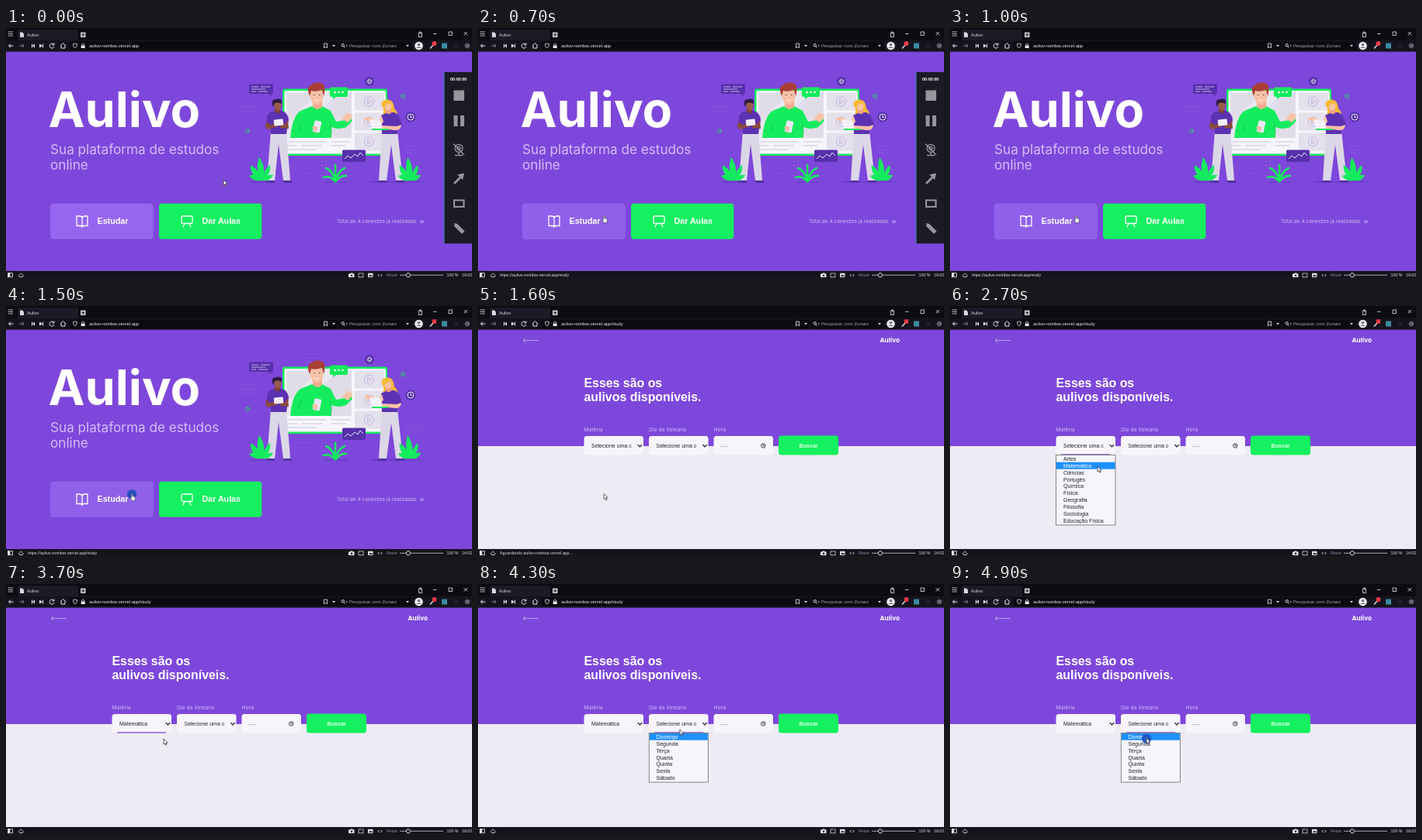
Animation, 600 px wide and 323 px high, one loop 5000 ms. Source, as an HTML page:

```html
<!DOCTYPE html>
<html lang="pt-BR">
<head>
<meta charset="utf-8">
<title>Aulivo</title>
<style>
html, body { margin: 0; width: 100%; height: 100%; overflow: hidden; background: #15131d; }
svg.stage { display: block; width: 100%; height: 100%; }
text { font-family: "Liberation Sans", Arial, sans-serif; white-space: pre; }
.geo { font-family: Inter, sans-serif; }
.b { font-weight: 700; }
.pale { fill: #d3bdf7; }
.line { fill: none; stroke: #e9e7ef; }
.k { animation: 5s step-end infinite; }

.home { animation-name: home; }
.path { animation-name: study; }
.panel { animation-name: panel; }
.hover { animation-name: hover; }
.wait { animation-name: wait; }
.empty { animation-name: empty; }
.chosen { animation-name: chosen; }
.focus1 { animation-name: focus1; }
.focus2 { animation-name: focus2; }
.menu1 { animation-name: menu1; }
.menu2 { animation-name: menu2; }
.arrow { animation-name: arrow; }
.click { animation-name: click; }
.row { animation-name: row; }
.cursor { animation: move 5s infinite; }

@keyframes home { 0% { visibility: visible } 32%, 100% { visibility: hidden } }
@keyframes study { 0% { visibility: hidden } 32%, 100% { visibility: visible } }
@keyframes panel { 0% { visibility: visible } 20%, 100% { visibility: hidden } }
@keyframes hover { 0%, 32%, 100% { visibility: hidden } 8% { visibility: visible } }
@keyframes arrow { 0%, 32%, 100% { visibility: visible } 8% { visibility: hidden } }
@keyframes wait { 0%, 42%, 100% { visibility: hidden } 32% { visibility: visible } }
@keyframes empty { 0% { visibility: visible } 72%, 100% { visibility: hidden } }
@keyframes chosen { 0% { visibility: hidden } 72%, 100% { visibility: visible } }
@keyframes focus1 { 0%, 82%, 100% { visibility: hidden } 46% { visibility: visible } }
@keyframes focus2 { 0% { visibility: hidden } 82%, 100% { visibility: visible } }
@keyframes menu1 { 0%, 72%, 100% { visibility: hidden } 48% { visibility: visible } }
@keyframes menu2 { 0% { visibility: hidden } 84%, 100% { visibility: visible } }
@keyframes click {
  0%, 32%, 48%, 72%, 84% { visibility: hidden }
  28%, 46%, 70%, 82%, 98%, 100% { visibility: visible }
}
@keyframes row {
  0%, 48% { transform: translateY(0) }
  54%, 68%, 100% { transform: translateY(8.92px) }
  56%, 66% { transform: translateY(26.76px) }
  58%, 62% { transform: translateY(53.52px) }
  60% { transform: translateY(71.36px) }
  64% { transform: translateY(35.68px) }
}
@keyframes move {
  0% { transform: translate(280px, 196px); animation-timing-function: steps(2) }
  4% { transform: translate(265px, 203px); animation-timing-function: steps(2) }
  8% { transform: translate(190px, 234px); animation-timing-function: steps(2) }
  12% { transform: translate(163px, 243px); animation-timing-function: steps(1) }
  14%, 38% { transform: translate(162px, 242.5px); animation-timing-function: steps(3) }
  44% { transform: translate(178px, 196px); animation-timing-function: steps(1) }
  46% { transform: translate(186px, 182px); animation-timing-function: steps(1) }
  48% { transform: translate(188px, 186px); animation-timing-function: steps(3) }
  54% { transform: translate(190px, 207px); animation-timing-function: steps(3) }
  60% { transform: translate(188px, 267px); animation-timing-function: steps(3) }
  66% { transform: translate(196px, 222px); animation-timing-function: steps(1) }
  68% { transform: translate(197px, 206px); animation-timing-function: steps(2) }
  72% { transform: translate(198px, 204px); animation-timing-function: steps(1) }
  74% { transform: translate(203px, 200px); animation-timing-function: steps(3) }
  80% { transform: translate(240px, 188px); animation-timing-function: steps(1) }
  82% { transform: translate(262px, 182px); animation-timing-function: steps(1) }
  84% { transform: translate(262px, 184px); animation-timing-function: steps(4) }
  92%, 100% { transform: translate(253px, 199px) }
}
</style>
</head>
<body>
<svg class="stage" viewBox="0 0 600 323" preserveAspectRatio="none">
<defs>
  <pattern id="dots" width="5" height="5" patternUnits="userSpaceOnUse"><circle cx="2" cy="2" r=".55" fill="#9a75e8"/></pattern>
  <clipPath id="rowClip"><rect class="k row" x="136" y="192.8" width="77.5" height="8.92"/></clipPath>
  <clipPath id="firstRow"><rect x="220" y="192.8" width="77" height="8.92"/></clipPath>
  <clipPath id="valueClip"><rect x="0" y="168" width="51.4" height="24"/></clipPath>
  <clipPath id="video"><rect x="361" y="60" width="85" height="82"/></clipPath>
  <path id="chev" d="M-2.7-1.3 0 1.4 2.7-1.3" fill="none" stroke="#222" stroke-width="1.3"/>
  <g id="play" fill="none" stroke="#c3b8dc"><circle r="6"/><path d="M-1.8-3 3 0-1.8 3z"/></g>
  <g id="bush"><path d="M0 0Q-10-12-4-30Q6-16 0 0"/><path d="M0 0Q-16-5-15-20Q-4-14 0 0"/><path d="M0 0Q2-15 10-20Q12-8 0 0"/><path d="M0 0Q-11 2-17-6Q-6-10 0 0M0 0Q9 2 14-7Q5-9 0 0"/></g>
  <text id="list1" font-size="7"><tspan x="146" y="199.8">Artes</tspan><tspan x="146" dy="8.92">Matemática</tspan><tspan x="146" dy="8.92">Ciências</tspan><tspan x="146" dy="8.92">Portugês</tspan><tspan x="146" dy="8.92">Química</tspan><tspan x="146" dy="8.92">Física</tspan><tspan x="146" dy="8.92">Geografia</tspan><tspan x="146" dy="8.92">Filosofia</tspan><tspan x="146" dy="8.92">Sociologia</tspan><tspan x="146" dy="8.92">Educação Física</tspan></text>
  <text id="list2" font-size="7"><tspan x="229.5" y="199.8">Domingo</tspan><tspan x="229.5" dy="8.92">Segunda</tspan><tspan x="229.5" dy="8.92">Terça</tspan><tspan x="229.5" dy="8.92">Quarta</tspan><tspan x="229.5" dy="8.92">Quinta</tspan><tspan x="229.5" dy="8.92">Sexta</tspan><tspan x="229.5" dy="8.92">Sábado</tspan></text>
</defs>

<!-- study page -->
<rect y="30" width="600" height="285" fill="#efebf5"/>
<rect y="30" width="600" height="151" fill="#7e47db"/>
<path d="M78 44.5H58M61.500 41.500 58 44.500 61.500 47.500" fill="none" stroke="#b79be9"/>
<text class="geo b" x="517.500" y="47.300" font-size="8.200" fill="#fff">Aulivo</text>
<g class="b" font-size="15.900" fill="#fff"><text x="136.500" y="105">Esses são os</text><text x="136.500" y="123.300">aulivos disponíveis.</text></g>
<g class="pale" font-size="6.800"><text class="geo" x="136.500" y="162">Matéria</text><text class="geo" x="220" y="162">Dia da Semana</text><text class="geo" x="303.500" y="162">Hora</text></g>
<g fill="#f7f5fb"><rect x="136.500" y="168" width="76.500" height="24.300" rx="3.500"/><rect x="220" y="168" width="76.500" height="24.300" rx="3.500"/><rect x="303.500" y="168" width="76.500" height="24.300" rx="3.500"/></g>
<use href="#chev" x="208.500" y="180.500"/><use href="#chev" x="292" y="180.500"/>
<g font-size="7" fill="#222">
  <g class="k empty" transform="translate(146 0)"><text y="183" clip-path="url(#valueClip)">Selecione uma o</text></g>
  <text class="k chosen" x="146" y="183">Matemática</text>
  <g transform="translate(229.500 0)"><text y="183" clip-path="url(#valueClip)">Selecione uma o</text></g>
  <text x="311" y="183" fill="#777">--:--</text>
</g>
<g fill="none" stroke="#222" stroke-width=".9"><circle cx="367.200" cy="180.500" r="2.700"/><path d="M367.200 178.700V180.700H368.700"/></g>
<rect x="387" y="167.500" width="77" height="25" rx="3.500" fill="#14f05f"/>
<text class="b" x="413.500" y="183" font-size="7.200" fill="#e9fff0">Buscar</text>
<rect class="k focus1" x="143" y="191.300" width="63" height="1.300" fill="#7e47db"/>
<rect class="k focus2" x="227" y="191.300" width="63" height="1.300" fill="#7e47db"/>
<g class="k menu1">
  <rect x="136.500" y="192.500" width="76.500" height="90.500" fill="#f7f5fb" stroke="#777" stroke-width=".9"/>
  <use href="#list1" fill="#222"/>
  <g clip-path="url(#rowClip)"><rect x="137" y="192.800" width="75.700" height="90" fill="#1e90ff"/><use href="#list1" fill="#fff"/></g>
</g>
<g class="k menu2">
  <rect x="220.300" y="192.500" width="76" height="63.600" fill="#f7f5fb" stroke="#777" stroke-width=".9"/>
  <use href="#list2" fill="#222"/>
  <g clip-path="url(#firstRow)"><rect x="220.800" y="192.800" width="75" height="63" fill="#1e90ff"/><use href="#list2" fill="#fff"/></g>
</g>

<!-- home page -->
<g class="k home">
  <rect y="30" width="600" height="285" fill="#7e47db"/>
  <text class="geo b" x="54.500" y="128" font-size="63" fill="#fff">Aulivo</text>
  <g class="pale" font-size="17.150"><text class="geo" x="57" y="162.500">Sua plataforma de estudos</text><text class="geo" x="57" y="182.500">online</text></g>
  <rect x="57" y="226.700" width="132.500" height="46" rx="4" fill="#9766f0"/>
  <rect class="k hover" x="57" y="226.700" width="132.500" height="46" rx="4" fill="#9060ea"/>
  <rect x="197" y="226.700" width="132.300" height="46" rx="4" fill="#14f05f"/>
  <g fill="none" stroke="#fff" stroke-width="1.300" stroke-linejoin="round" stroke-linecap="round">
    <path d="M98 245.500Q97.500 243 94.500 243H91V255.500H95.500Q98 255.500 98 257.500Q98 255.500 100.500 255.500H105V243H101.500Q98.500 243 98 245.500V257"/>
    <rect x="226" y="243" width="14" height="9.500" rx="1.500"/><path d="M230 252.500 228 257M236 252.500 238 257"/>
  </g>
  <g class="b" font-size="10.700" fill="#fff"><text x="117.500" y="253.400">Estudar</text><text x="252.500" y="253.400">Dar Aulas</text></g>
  <text class="geo pale" x="426" y="251.800" font-size="6.500">Total de 4 conexões já realizadas</text>
  <path d="M535.500 253C531 250 532.500 247 535.500 248.700C538.500 247 540 250 535.500 253Z" fill="#a57cf2"/>

  <!-- illustration -->
  <g>
    <rect x="300" y="98" width="31" height="17" fill="url(#dots)"/><rect x="386" y="60" width="25" height="16" fill="url(#dots)"/>
    <rect x="515" y="148" width="30" height="18" fill="url(#dots)"/><rect x="375" y="166" width="40" height="30" fill="url(#dots)"/>
    <rect x="356" y="78.500" width="135" height="86.500" rx="3" fill="#14f05f"/>
    <rect x="358.500" y="81" width="130.500" height="81.500" rx="2" fill="#f7f5fb"/>
    <rect x="361" y="83.500" width="84" height="58.500" fill="#e0dde8"/>
    <path d="M361 125 402 83.500H428L370 142H361Z" fill="#e9e7ef"/>
    <g fill="#e4e0ec"><rect x="449" y="83.500" width="38" height="23" rx="1.500"/><rect x="449" y="109.500" width="38" height="23" rx="1.500"/><rect x="449" y="135.500" width="38" height="23" rx="1.500"/></g>
    <use href="#play" x="467.500" y="95"/><use href="#play" x="467.500" y="121"/><use href="#play" x="467.500" y="147"/>
    <path d="M361 147H412M361 152H375M380 152H407M361 157H400M419 147H443M419 152H437" stroke="#e0dce9" stroke-width="2"/>
    <g clip-path="url(#video)">
      <path d="M366 143Q368 115 379 107L394 101H407L418 107 425 121 437 119 443 113 446 120 438 128Q428 132 419 128L418 143Z" fill="#14ec5d"/>
      <path d="M378 142Q376 127 382 121M418 143Q420 134 418 122" fill="none" stroke="#0bc54b" stroke-width=".8"/>
      <path d="M395 92V102Q401 108 407 102V92Z" fill="#f2ab8d"/>
      <path d="M392 82Q391 98 400 99Q409 98 409 82L399 77Z" fill="#f8c1a5"/>
      <path d="M391 88Q386 77 392 74Q401 67 409 73Q412 77 409 88L407 80Q397 83 393 81Z" fill="#a83e35"/>
      <path d="M397 93Q400 95 403 93" fill="none" stroke="#fff" stroke-width=".9"/><path d="M396 86.500H397.500M403 86.500H404.500" stroke="#493050"/>
    </g>
    <path d="M432 117Q437 115 439 108L441 112L444 110L446 116L440 122Z" fill="#f8c1a5"/>
    <path d="M371 136 384 131 395 125 400 130 393 137 382 142H370Z" fill="#14ec5d"/>
    <rect x="396" y="120" width="9" height="15" rx="1.500" fill="#eee7fa" transform="rotate(12 401 128)"/>
    <path d="M394 128Q399 125 402 129L398 136Z" fill="#f8c1a5"/>

    <!-- person on the left -->
    <path d="M341 133 336 197H346L351 150 357 197H366L361 133Z" fill="#dcd7e6"/>
    <path d="M337 197H346V200H334ZM357 197H366L369 200H357Z" fill="#51329f"/>
    <path d="M337 112Q341 107 347 107H355Q362 108 364 118L361 137H341L340 126 335 124Z" fill="#5c32b2"/>
    <path d="M335 121Q333 129 337 131L351 127 350 123 340 125ZM363 119 364 130 353 129 353 125 359 124Z" fill="#8a4b3d"/>
    <path d="M346 98H353V109Q349 112 346 108Z" fill="#7d4135"/><ellipse cx="350" cy="100" rx="4.500" ry="6.500" fill="#99584a"/>
    <path d="M344 102Q340 92 348 92Q356 90 355 98Q351 95 346 97Z" fill="#2e1b40"/>
    <rect x="345" y="118" width="12" height="8" rx="1" fill="#f4eefb" transform="rotate(-5 351 122)"/>

    <!-- person on the right -->
    <path d="M486 104Q480 96 488 93Q499 90 500 104Q506 110 504 117H482Q487 112 486 104Z" fill="#f5ba38"/>
    <path d="M484 133 480 197H490L496 151 502 197H511L504 133Z" fill="#dcd7e6"/>
    <path d="M481 197H490V200H477ZM502 197H511L514 200H502Z" fill="#51329f"/>
    <path d="M483 113 491 109H499Q507 110 510 126L504 128 504 137H484Z" fill="#5c32b2"/>
    <path d="M489 101H496V110Q492 113 489 109Z" fill="#ee9f82"/><ellipse cx="492" cy="101" rx="4.500" ry="6" fill="#f8c1a5"/>
    <path d="M486 102Q485 93 492 94Q499 94 499 108Q496 101 495 97Q490 99 486 102Z" fill="#f5ba38"/>
    <path d="M509 125Q508 133 501 132L483 130 484 126 503 127ZM484 114 476 125 481 129 486 121ZM474 117 462 115V119L476 124Z" fill="#f8c1a5"/>
    <path d="M468 118 482 119 485 131H471Z" fill="#f6f1fd"/><path d="M471 130H492V132H471Z" fill="#14ec5d"/>

    <!-- floating badges -->
    <g fill="#572fac"><path d="M315 72.500H342Q344 72.500 344 74V83Q344 85 342 85H341L342 88 337 85H315Q313 85 313 83V74Q313 72.500 315 72.500Z"/><rect x="433" y="157.500" width="30" height="15.500" rx="1.500"/><circle cx="468" cy="69" r="6"/><circle cx="521" cy="115" r="6.500"/></g>
    <path d="M316 76H325M328 76H340M316 79H334M316 82H322M325 82H337" stroke="#cdbbf2" stroke-width=".9"/>
    <path d="M419 76.500H438Q440 76.500 440 78.500V87Q440 89 438 89H425L421 92V89H419Q417 89 417 87V78.500Q417 76.500 419 76.500Z" fill="#14ec5d"/>
    <g fill="#fff"><circle cx="423.500" cy="83" r="1.300"/><circle cx="428.500" cy="83" r="1.300"/><circle cx="433.500" cy="83" r="1.300"/></g>
    <path d="M436 169 440 165 444 168 449 163 453 166 456 161 460 165" class="line"/>
    <g class="line"><circle cx="468" cy="69" r="2"/><circle cx="468" cy="69" r="3.200" stroke-dasharray="1.200 1.300"/><circle cx="521" cy="115" r="4"/><path d="M521 112.500V115.500H523"/></g>
    <g fill="#14ec5d"><use href="#bush" x="330" y="197"/><use href="#bush" transform="translate(521 197) scale(.95 1)"/></g>
    <path d="M424 199V177M424 199Q421 184 412 181M424 199Q427 185 436 181M424 199Q418 190 409 193M424 199Q430 190 438 191" fill="none" stroke="#14ec5d" stroke-width="2.600" stroke-linecap="round"/>
    <g fill="none" stroke="#14ec5d"><circle cx="511" cy="88" r="2.200"/><circle cx="311" cy="133" r="2.200"/><path d="M512.500 89.500 514.500 91.500"/></g>
    <path d="M314 199H345M410 199H440M470 199H535" stroke="#572fac" stroke-width=".7"/>
  </g>

  <!-- recorder panel -->
  <g class="k panel">
    <rect x="564" y="57" width="36" height="221.500" fill="#1c1a26"/>
    <rect x="563.700" y="57" width=".9" height="221.500" fill="#258ca0"/>
    <text class="b" x="572" y="67.700" font-size="5.300" fill="#fff">00:00:00</text>
    <g fill="#96969c"><rect x="576.500" y="80.500" width="13.500" height="13.500"/><rect x="576.500" y="113" width="5" height="14"/><rect x="585" y="113" width="5" height="14"/></g>
    <g fill="none" stroke="#96969c" stroke-width="1.300"><circle cx="583" cy="155.500" r="5"/><circle cx="583" cy="155.500" r="2"/><path d="M576 149.500 590 164M583 161V164M578 164.500H588"/></g>
    <path d="M576 200 584 192 581 189.500 590 187.500 588 196.500 586 194 578 202Z" fill="#96969c"/>
    <rect x="577" y="222.500" width="12.500" height="8.500" fill="none" stroke="#96969c" stroke-width="2"/>
    <path d="M577 252 581 253 590.500 262.500 587 266 577.500 256.500Z" fill="#96969c"/>
  </g>
</g>

<!-- browser frame -->
<rect width="600" height="30.600" fill="#15131d"/>
<rect width="600" height="15.500" fill="#0c0b11"/>
<rect x="15" y="2" width="78" height="14" rx="1.500" fill="#1c1a26"/>
<rect x="82" y="17.500" width="345" height="11" rx="1.500" fill="#0b0a11"/>
<rect x="428.500" y="17.500" width="94" height="11" rx="1.500" fill="#0b0a11"/>
<path class="line" stroke-width=".8" d="M2.500 5H9M2.500 7.500H9M2.500 10H9M550 7.500H554.500M570 5H574.500V9.500H570ZM589.500 5 594 9.500M594 5 589.500 9.500"/>
<path d="M18 5.500H21L23 7.500V12H18Z" fill="#d9d7df"/>
<text x="27" y="11.300" font-size="5.700" fill="#d9d7df">Aulivo</text>
<rect x="96" y="5.500" width="6.500" height="6.500" rx=".8" fill="#c9c7d0"/><path d="M99.250 6.800V10.700M97.300 8.750H101.200" stroke="#15131d"/>
<path class="line" stroke-width=".8" d="M531 6.500H536M531.500 7V11.500H535.500V7M532.500 6V5H534.500V6"/>
<g class="line">
  <path d="M9.500 23H3.500M6 20.500 3.500 23 6 25.500"/><path d="M17 23H23M20.500 20.500 23 23 20.500 25.500" stroke="#85828f"/>
  <path d="M61.300 21A3 3 0 1 0 62 24M62 19.500V22H59.500"/><path d="M70 23 73.500 19.500 77 23M71 22.500V26H76V22.500"/>
  <path d="M86.500 20.500Q89 20.500 89 19.500Q89 20.500 91.500 20.500Q91.500 25 89 26Q86.500 25 86.500 20.500Z" stroke-width=".8"/>
  <path d="M97.700 22.500V21Q99.200 18.500 100.700 21V22.500" stroke-width=".8"/><path d="M409.500 20H413.500V26L411.500 24 409.500 26Z" stroke-width=".8"/>
  <circle cx="433.700" cy="22.300" r="1.700"/><path d="M435 23.700 436.700 25.500"/>
</g>
<path d="M33 20.500H34V25.500H33ZM37 20.500V25.500L34 23ZM43 20.500V25.500L47 23ZM47 20.500H48V25.500H47ZM96.700 22.500H101.700V26H96.700ZM420 22H424L422 24.300ZM515 22H519L517 24.300ZM437.500 22.500H440L438.800 24Z" fill="#e9e7ef"/>
<text x="107" y="25.200" font-size="5.750" fill="#efedf5">aulivo-nombar.vercel.app<tspan class="k path">/study</tspan></text>
<text x="442" y="25.200" font-size="6.150" fill="#a5a2ae">Pesquisar com Zunavi</text>
<circle cx="531.500" cy="23" r="5.300" fill="#eeecf2"/><circle cx="531.500" cy="21.500" r="1.800" fill="#777482"/><path d="M528 26Q531.500 22.500 535 26Z" fill="#777482"/>
<path d="M546 26.500 550 22" stroke="#d9d7df" stroke-width="1.500"/><circle cx="551.500" cy="20" r="2.900" fill="#ef3b45"/>
<rect x="561" y="19.500" width="7" height="7" fill="#3b8ba0"/><circle cx="579.500" cy="23" r="2.500" fill="#24212c"/>
<g fill="none" stroke="#b5b2bd"><circle cx="594" cy="23" r="1.600"/><circle cx="594" cy="23" r="3" stroke-dasharray="1.200 1.150"/></g>

<!-- status bar -->
<rect y="314" width="600" height="9" fill="#15131d"/>
<rect x="2.500" y="316.700" width="6" height="5" class="line" stroke-width=".8"/><rect x="2.500" y="316.700" width="2.800" height="5" fill="#e9e7ef"/>
<path class="line" stroke-width=".8" d="M17.500 321.500H21.500Q23 319.500 21 318.500Q19.500 315.500 17.500 318.500Q15 319.500 17.500 321.500Z"/>
<g font-size="5.300" fill="#dddbe3">
  <text class="k hover" x="28" y="321">https://aulivo-nombar.vercel.app/study</text>
  <text class="k wait" x="28" y="321">Aguardando aulivo-nombar.vercel.app...</text>
  <text x="490" y="321" fill="#8a8794">Reset</text><text x="567.500" y="321">100 %</text><text x="587" y="321">16:02</text>
</g>
<path d="M441 317.500H443L444 316.500H446L447 317.500H448.500V322H441Z" fill="#e9e7ef"/><circle cx="445" cy="319.700" r="1.300" fill="#15131d"/>
<rect x="454" y="317" width="6" height="4.800" class="line" stroke-width=".7"/>
<rect x="466" y="316.800" width="6.500" height="5.200" fill="#e9e7ef"/><path d="M467 321 469 318.500 470 320 471 319 472 321Z" fill="#15131d"/>
<path class="line" stroke-width=".9" d="M480.500 318 479 319.500 480.500 321M482.500 318 484 319.500 482.500 321"/>
<path d="M507 319.300H563" stroke="#aaa7b3" stroke-width="1.100"/><circle cx="518" cy="319.300" r="2.600" fill="#15131d" stroke="#e9e7ef" stroke-width=".9"/>

<g class="cursor">
  <g class="k click"><circle cy=".8" r="6.300" fill="#1c55c4" fill-opacity=".85"/><circle cy=".8" r="3.800" fill="none" stroke="#2438a0"/></g>
  <path class="k arrow" d="M0 0V7.200L1.700 5.700 2.800 8.200 4 7.700 2.900 5.200H5Z" fill="#fff" stroke="#222" stroke-width=".7"/>
  <path class="k hover" d="M-.6 5.500V.8Q.2-.2 1 .8V3.200L4 4Q4.700 4.300 4.500 6L3.800 9H0L-2.500 5.500Q-1.700 4.500-.6 5.500Z" fill="#fff" stroke="#222" stroke-width=".6"/>
</g>
</svg>
</body>
</html>
```
